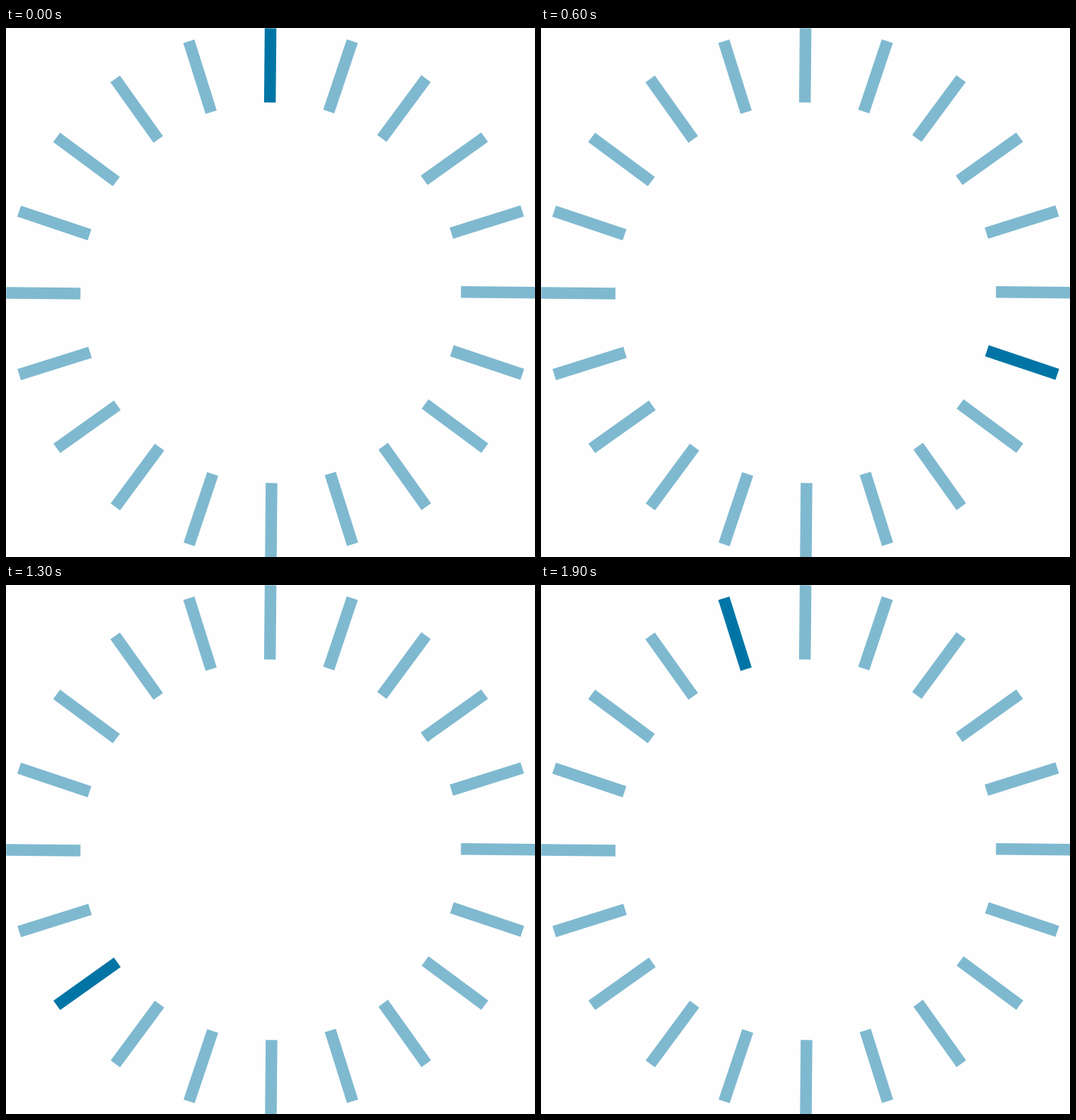
An HTML page for the animation above (2 s loop, 748x748 px).

```html
<!DOCTYPE html>
<html lang="en">
<head>
<meta charset="utf-8">
<title>Spinner</title>
<style>
  html, body { margin: 0; width: 100%; height: 100%; overflow: hidden; background: #fefefe; }
  svg { display: block; width: 100vw; height: 100vh; }
</style>
</head>
<body>
<svg viewBox="0 0 748 748"></svg>
<script>
const COUNT = 20, STEP_MS = 100;
const IDLE = '#7fb9d0', ACTIVE = '#0075a5';
const svg = document.querySelector('svg');

// Each bar leans slightly off its radius.
const bars = Array.from({ length: COUNT }, (_, i) => {
  const bar = document.createElementNS('http://www.w3.org/2000/svg', 'path');
  bar.setAttribute('d', 'M-0.2 -374L-1.15 -269');
  bar.setAttribute('stroke-width', 16.5);
  bar.setAttribute('transform', `translate(374.3 374.4) rotate(${i * 360 / COUNT})`);
  return svg.appendChild(bar);
});

const start = performance.now();
function draw(now) {
  const active = Math.floor(Math.max(0, now - start) / STEP_MS) % COUNT;
  bars.forEach((bar, i) => bar.setAttribute('stroke', i === active ? ACTIVE : IDLE));
  requestAnimationFrame(draw);
}
draw(start);
</script>
</body>
</html>
```
